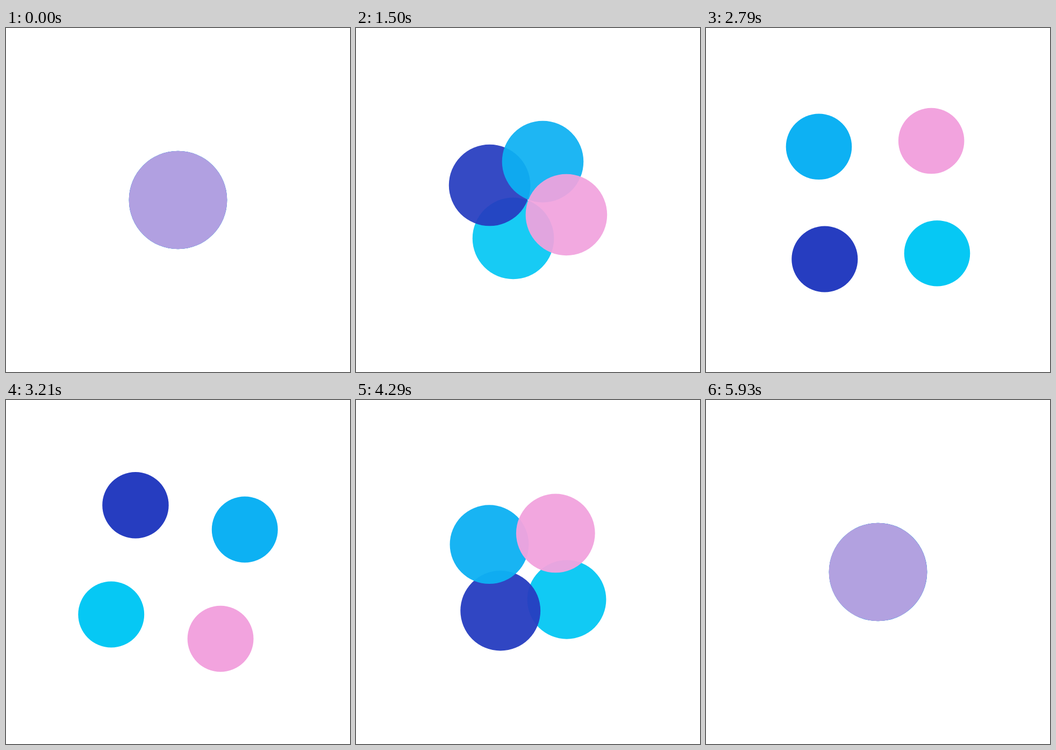
Recreate the animation shown at these times as an HTML page with a canvas. Size 640x640 px, loop 6000 ms.

```html
<!DOCTYPE html>
<html lang="en">
<head>
<meta charset="utf-8">
<title>Four circles</title>
<style>
  html, body { margin: 0; width: 100%; height: 100%; overflow: hidden; background: #fff; }
  canvas { display: block; }
</style>
</head>
<body>
<canvas width="640" height="640"></canvas>
<script>
const ctx = document.querySelector('canvas').getContext('2d');
const LOOP = 6000;
const STEPS = 84;    // pictures shown per loop
const FRAMES = 150;  // motion frames per loop
const COLORS = ['#06c8f4', '#263dc0', '#0db1f3', '#f2a3de']; // bottom to top
const BLUE = 1;

const smooth = t => t * t * (3 - 2 * t);

// cubic-bezier(a, 0, 1 - a, 1), solved by bisection
function ease(x, a) {
  let lo = 0, hi = 1, t;
  for (let i = 0; i < 30; i++) {
    t = (lo + hi) / 2;
    const u = 1 - t;
    if (3 * u * u * t * a + 3 * u * t * t * (1 - a) + t ** 3 < x) lo = t;
    else hi = t;
  }
  return smooth(t);
}

// the blue circle lags a little behind the others in size
const lag = x => x < 0.5
  ? 0.6 * Math.max(0, -Math.sin(4 * Math.PI * x))
  : -1.1 * Math.sin(2 * Math.PI * x);

function draw(x) {
  const half = 1 - Math.abs(2 * x - 1);
  const spread = smooth(half);
  const turn = Math.PI * (6 * ease(x, 0.25) - 1);
  ctx.globalAlpha = 1;
  ctx.clearRect(0, 0, 640, 640);
  ctx.globalAlpha = Math.min(1, 0.7 + 0.45 * half);
  COLORS.forEach((color, i) => {
    const angle = turn + (i + 1) * Math.PI / 2;
    const r = 91.3 - 30.4 * spread + (i === BLUE ? lag(x) : 0);
    ctx.fillStyle = color;
    ctx.beginPath();
    ctx.arc(320 + 150 * spread * Math.cos(angle), 320 + 150 * spread * Math.sin(angle), r, 0, 2 * Math.PI);
    ctx.fill();
  });
}

const start = performance.now();
function tick() {
  const t = (performance.now() - start) % LOOP;
  const step = Math.min(STEPS - 1, Math.floor((t + 5) * STEPS / LOOP));
  draw(Math.ceil(step * FRAMES / STEPS) / FRAMES);
  requestAnimationFrame(tick);
}
tick();
</script>
</body>
</html>
```
